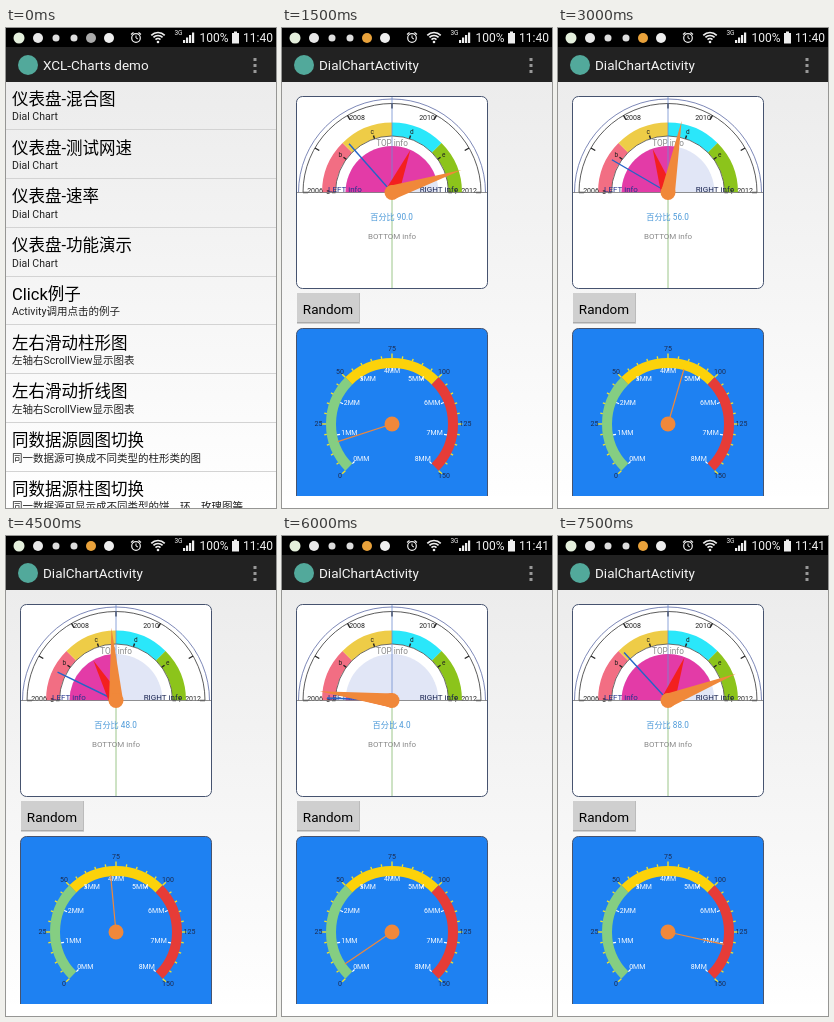
An HTML page with a canvas that plays this animation: 270 by 480 pixels, repeating every 9 s.

```html
<!DOCTYPE html>
<html lang="zh-CN">
<head>
<meta charset="utf-8">
<title>Chart demo</title>
<style>
html, body { margin: 0; width: 100%; height: 100%; overflow: hidden; background: #fff; }
canvas { display: block; width: 270px; height: 480px; }
</style>
</head>
<body>
<canvas id="stage" width="270" height="480"></canvas>
<script>
const ctx = document.getElementById('stage').getContext('2d');
const FONT = 'Roboto, "Noto Sans CJK SC", "Noto Sans CJK", sans-serif';
const STEP = 1500;
const ORANGE = '#f0883a';
const rad = deg => deg * Math.PI / 180;
const polar = (cx, cy, r, deg) => [cx + r * Math.cos(rad(deg)), cy + r * Math.sin(rad(deg))];

const rows = [
  ['仪表盘-混合图', 'Dial Chart'],
  ['仪表盘-测试网速', 'Dial Chart'],
  ['仪表盘-速率', 'Dial Chart'],
  ['仪表盘-功能演示', 'Dial Chart'],
  ['Click例子', 'Activity调用点击的例子'],
  ['左右滑动柱形图', '左轴右ScrollView显示图表'],
  ['左右滑动折线图', '左轴右ScrollView显示图表'],
  ['同数据源圆图切换', '同一数据源可换成不同类型的柱形类的图'],
  ['同数据源柱图切换', '同一数据源可显示成不同类型的饼、环、玫瑰图等']
];

// The first entry is the list; the others are percentages for the two dials.
const scenes = [
  null,
  { upper: 90, lower: 10 },
  { upper: 56, lower: 56 },
  { upper: 48, lower: 48 },
  { upper: 4, lower: 4 },
  { upper: 88, lower: 88 }
];

function text(str, x, y, size, color, align = 'center', baseline = 'middle') {
  ctx.font = `${size}px ${FONT}`;
  ctx.fillStyle = color;
  ctx.textAlign = align;
  ctx.textBaseline = baseline;
  ctx.fillText(str, x, y);
}

function rect(x, y, w, h, color) {
  ctx.fillStyle = color;
  ctx.fillRect(x, y, w, h);
}

function line(x1, y1, x2, y2, color, width = 1) {
  ctx.strokeStyle = color;
  ctx.lineWidth = width;
  ctx.beginPath();
  ctx.moveTo(x1, y1);
  ctx.lineTo(x2, y2);
  ctx.stroke();
}

function disc(x, y, r, color) {
  ctx.fillStyle = color;
  ctx.beginPath();
  ctx.arc(x, y, r, 0, 2 * Math.PI);
  ctx.fill();
}

function arc(cx, cy, r, from, to, color, width) {
  ctx.strokeStyle = color;
  ctx.lineWidth = width;
  ctx.beginPath();
  ctx.arc(cx, cy, r, rad(from), rad(to));
  ctx.stroke();
}

function wedge(cx, cy, r, from, to, color) {
  ctx.fillStyle = color;
  ctx.beginPath();
  ctx.moveTo(cx, cy);
  ctx.arc(cx, cy, r, rad(from), rad(to));
  ctx.fill();
}

function tick(cx, cy, r1, r2, deg, color, width) {
  line(...polar(cx, cy, r1, deg), ...polar(cx, cy, r2, deg), color, width);
}

function triangle(cx, cy, length, halfWidth, deg, color) {
  ctx.fillStyle = color;
  ctx.beginPath();
  ctx.moveTo(...polar(cx, cy, length, deg));
  ctx.lineTo(...polar(cx, cy, halfWidth, deg + 90));
  ctx.lineTo(...polar(cx, cy, halfWidth, deg - 90));
  ctx.fill();
}

function card(x, y, w, h, fill) {
  ctx.fillStyle = fill;
  ctx.strokeStyle = '#46536f';
  ctx.lineWidth = 1;
  ctx.beginPath();
  ctx.roundRect(x, y, w, h, 6);
  ctx.fill();
  ctx.stroke();
}

function statusBar(clock, inList) {
  rect(0, 0, 270, 19, '#000');
  disc(13, 10, 5.5, '#e4efdc');
  disc(32, 10, 5, '#e8e8e8');
  disc(50, 10, 3.5, '#ddd');
  disc(68, 10, 3.5, '#ddd');
  disc(85, 10, 5, inList ? '#aaa' : '#e9a23b');
  disc(103, 10, 5, '#eee');

  arc(130, 10, 4.3, 0, 360, '#eee', 1.2);
  line(130, 7.5, 130, 10, '#eee');
  line(130, 10, 132, 11, '#eee');
  line(125, 6.5, 127.5, 4.5, '#eee', 1.3);
  line(132.5, 4.5, 135, 6.5, '#eee', 1.3);

  for (const r of [3.5, 6.5, 9.5]) arc(152, 14, r, 225, 315, '#eee', 1.7);
  disc(152, 14, 1.3, '#eee');
  text('3G', 172.5, 5.5, 6.5, '#eee');
  for (let i = 0; i < 4; i++) rect(177 + i * 3, 12 - i * 2.5, 2.2, 3 + i * 2.5, '#eee');
  text('100%', 193.5, 10.5, 12, '#eee', 'left');
  rect(226, 5, 7, 10.5, '#eee');
  rect(228, 3.5, 3, 2, '#eee');
  text(clock, 267, 10.5, 12, '#eee', 'right');
}

function actionBar(title) {
  rect(0, 19, 270, 35, '#222');
  disc(22, 37, 10, '#52a99b');
  text(title, 37, 42, 13.5, '#f3f3f3', 'left', 'alphabetic');
  for (const y of [30, 36, 42]) rect(247.5, y, 3, 3, '#999');
}

function background() {
  const shade = ctx.createLinearGradient(0, 54, 0, 480);
  shade.addColorStop(0, '#ececec');
  shade.addColorStop(1, '#fff');
  rect(0, 0, 270, 480, shade);
}

function list() {
  rows.forEach(([title, detail], i) => {
    const top = 54 + i * 48.75;
    text(title, 6, top + 22.75, 16.5, '#000', 'left', 'alphabetic');
    text(detail, 6, top + 38.25, 10.5, '#222', 'left', 'alphabetic');
    rect(0, Math.floor(top + 47.75), 270, 1, '#d3d3d3');
  });
}

function upperDial(percent) {
  const cx = 110, cy = 164.5;
  const angleAt = share => 180 + 1.8 * percent * share;
  card(14.5, 68.5, 191, 192, '#fff');
  arc(cx, cy, 93.5, 180, 360, '#5c6aa5', 0.8);
  arc(cx, cy, 89, 180, 360, '#333', 0.8);

  ['#f26e83', '#eecc47', '#2ae7fa', '#8cc41b'].forEach((color, i) =>
    arc(cx, cy, 63.25, 180 + i * 45, 225 + i * 45, color, 13.5));
  arc(cx, cy, 56.5, 180, 360, '#333', 0.7);

  wedge(cx, cy, 46.5, 180, 360, '#e1e6f6');
  wedge(cx, cy, 46.5, 180, angleAt(1), '#e33ba7');

  for (let i = 0; i <= 6; i++) tick(cx, cy, 84, 89, 180 + i * 30, '#222', 1.4);
  [['2006', 33, 163], ['2008', 75, 89.5], ['2010', 145, 89.5], ['2012', 187, 163]]
    .forEach(label => text(...label, 7, '#222'));
  [...'abcdef'].forEach((letter, i) => {
    const deg = 180 + i * 36;
    tick(cx, cy, 56.5, 60, deg, '#222', 1.4);
    text(letter, ...polar(cx, cy, 64, deg), 6.5, '#222');
  });

  line(cx, 69, cx, cy, '#6f8fd0', 0.8);
  line(cx, cy, cx, 260, '#84b86c', 0.8);
  line(15, cy, 205, cy, '#777', 0.8);

  text('TOP info', 110, 115.5, 8.2, '#888');
  text('LEFT info', 63, 161.5, 8, '#22338c');
  text('RIGHT info', 157, 161.5, 8, '#17224f');
  text(`百分比 ${percent.toFixed(1)}`, 109.5, 190, 8.2, '#4a98d8');
  text('BOTTOM info', 110, 209, 8, '#888');

  tick(cx, cy, 0, 65, angleAt(0.3), '#2464c8', 1.4);
  triangle(cx, cy, 46, 7, angleAt(0.7), '#f3201f');
  triangle(cx, cy, 73, 7, angleAt(1), ORANGE);
  disc(cx, cy, 7.5, ORANGE);
}

function button() {
  rect(15, 265, 63, 30, '#cfcfcf');
  rect(15, 294, 63, 1.5, '#aaa');
  rect(77, 265, 1, 30, '#bbb');
  text('Random', 46, 285.5, 13.5, '#000', 'center', 'alphabetic');
}

function lowerDial(percent) {
  const cx = 110, cy = 396;
  ctx.save();
  ctx.beginPath();
  ctx.rect(0, 295, 270, 173);
  ctx.clip();
  card(14.5, 300.5, 191, 192, '#1e81f2');

  ['#85ce82', '#fcd20a', '#e63c37'].forEach((color, i) =>
    arc(cx, cy, 61, 135 + i * 90, 225 + i * 90, color, 10));
  for (let i = 0; i <= 30; i++) {
    tick(cx, cy, 66, i % 5 ? 68.5 : 70.5, 135 + i * 9, '#eee12e', 1.4);
  }
  for (let i = 0; i <= 6; i++) {
    text(i * 25, ...polar(cx, cy, i === 3 ? 75.5 : 73.5, 135 + i * 45), 7, '#1c2c50');
  }
  for (let i = 0; i <= 8; i++) {
    const deg = 135 + i * 33.75;
    tick(cx, cy, 53, 56, deg, '#fff', 1.2);
    text(i + 'MM', cx + 43.5 * Math.cos(rad(deg)), cy - 1.5 + 52 * Math.sin(rad(deg)), 7, '#fff');
  }

  tick(cx, cy, 0, 57, 135 + 2.7 * percent, ORANGE, 1.2);
  disc(cx, cy, 7.5, ORANGE);
  ctx.restore();
}

function draw(now) {
  const index = Math.floor(now / STEP) % scenes.length;
  const scene = scenes[index];
  background();
  if (scene) {
    upperDial(scene.upper);
    button();
    lowerDial(scene.lower);
    rect(0, 468, 270, 12, '#fff');
  } else {
    list();
  }
  statusBar(index < 4 ? '11:40' : '11:41', !scene);
  actionBar(scene ? 'DialChartActivity' : 'XCL-Charts demo');
}

const start = performance.now();
function play() {
  draw(performance.now() - start);
  requestAnimationFrame(play);
}
play();
</script>
</body>
</html>
```
